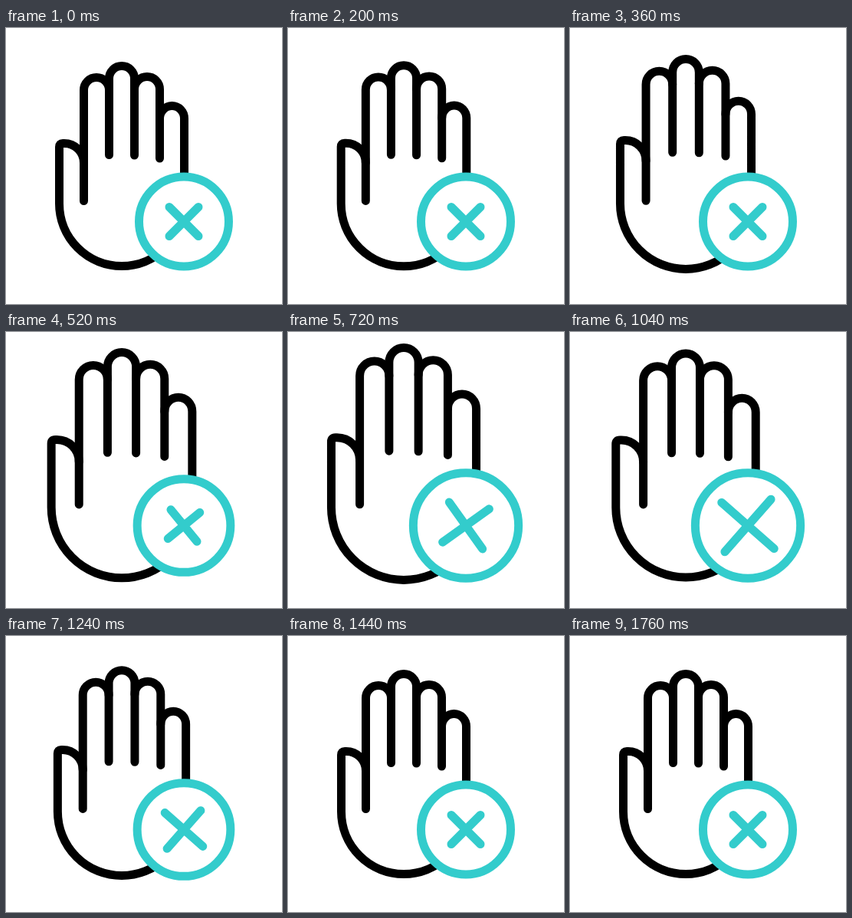
Recreate the animation shown at these times as an HTML page. Size 360 by 360 pixels, loop 1880 ms.

```html
<!DOCTYPE html>
<html lang="en">
<head>
<meta charset="utf-8">
<title>Raised hand with cross</title>
<style>
  html, body { margin: 0; width: 100%; height: 100%; overflow: hidden; background: #fff; }
  svg { display: block; width: 100%; height: 100%; }
  path, circle {
    fill: none;
    stroke-width: 11;
    stroke-linecap: round;
    stroke-linejoin: round;
    vector-effect: non-scaling-stroke;
  }
</style>
</head>
<body>
<svg viewBox="0 0 360 360">
  <!-- Coordinates are relative to each part's scaling centre -->
  <g id="hand" stroke="#000">
    <path d="M-49.5 -4.5 V-149 a16.5 16.5 0 0 1 33 0"/>
    <path d="M-16.5 -64.5 V-164 a16.5 16.5 0 0 1 33 0 V-64"/>
    <path d="M16.5 -150 a16.5 16.5 0 0 1 33 0 V-60"/>
    <path d="M49.5 -112 a16 16.5 0 0 1 32 0 V-1 a81.5 81.5 0 0 1 -163 0 V-75 q0 -4.5 4.5 -4.5 h2 a25.5 25.5 0 0 1 25.5 25.5"/>
  </g>
  <g stroke="#33cccc" transform="translate(232 252.5)">
    <circle id="badge" r="58.5" style="fill:#fff"/>
    <path id="cross" d="M-19 -19 L19 19 M-19 19 L19 -19"/>
  </g>
</svg>
<script>
  const LOOP = 1880, STEP = 40;
  const [hand, badge, cross] = ['hand', 'badge', 'cross'].map(id => document.getElementById(id));

  const ease = u => u < 0.5 ? 2 * u * u : 1 - 2 * (1 - u) ** 2;

  // Eased value at time t through [time, value] keys
  function track(t, keys) {
    const next = keys.findIndex(([time]) => time > t);
    if (next === 0) return keys[0][1];
    if (next < 0) return keys[keys.length - 1][1];
    const [t0, v0] = keys[next - 1], [t1, v1] = keys[next];
    return v0 + (v1 - v0) * ease((t - t0) / (t1 - t0));
  }

  const handScale = [[140, 1], [700, 1.16], [840, 1.16], [1400, 1]];
  const badgeRadius = [[360, 58.5], [880, 71], [1400, 58.5]];
  const crossScale = [[520, 1], [920, 1.78], [1440, 1]];
  const crossAngle = [[360, 0], [660, 10], [1140, -5], [1400, 0]];

  function draw(now) {
    const t = Math.floor(now % LOOP / STEP) * STEP;
    hand.setAttribute('transform', `translate(151 230) scale(${track(t, handScale)})`);
    badge.setAttribute('r', track(t, badgeRadius));
    cross.setAttribute('transform', `rotate(${track(t, crossAngle)}) scale(${track(t, crossScale)})`);
  }

  const start = performance.now();
  function frame() {
    draw(performance.now() - start);
    requestAnimationFrame(frame);
  }
  frame();
</script>
</body>
</html>
```
